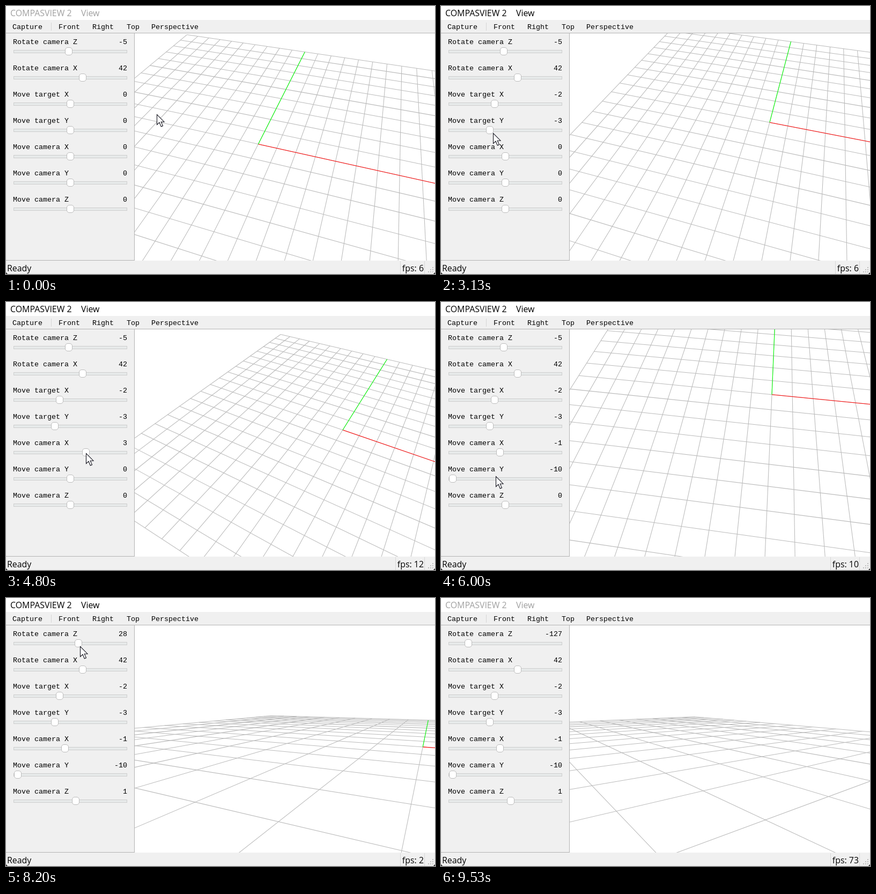
Write an HTML page with a canvas that moves like this. It is 800x500 px and loops after 9670 ms.

```html
<!DOCTYPE html>
<html lang="en">
<head>
<meta charset="utf-8">
<title>COMPASVIEW 2</title>
<style>
  html, body { margin: 0; width: 100%; height: 100%; overflow: hidden; background: #f0f0f0; }
  #app { position: absolute; left: 0; top: 0; width: 800px; height: 500px; overflow: hidden; background: #f0f0f0; color: #000; }
  #app * { position: absolute; box-sizing: border-box; white-space: pre; }
  .ui { font: 15.9px/26px "Open Sans", "Noto Sans", sans-serif; }
  .mono { font: 13.333px/16px "Liberation Mono", "Courier New", monospace; }
  #menu { left: 0; top: 0; width: 800px; height: 26px; background: #fff; }
  #menu.idle { color: #a0a0a0; }
  #tools { left: 0; top: 26px; width: 800px; height: 25px; border-bottom: 1px solid #b4b4b4; }
  #tools span { top: 6px; }
  #hover { left: 2px; top: 2px; width: 80px; height: 21px; background: #e2f1fd; border: 1px solid #cce8ff; }
  #panel { left: 0; top: 51px; width: 240px; height: 424px; border: solid #b4b4b4; border-width: 0 1px 1px 0; }
  #view { left: 240px; top: 51px; }
  .row { left: 0; width: 239px; height: 40px; }
  .row span { top: 0; left: 13px; }
  .row b { top: 0; right: 13px; font-weight: normal; }
  .groove { left: 14px; top: 22px; width: 212px; height: 6px; background: #e7eaea; border: 1px solid #cdcdcd; }
  .thumb { top: 17px; width: 14px; height: 15px; background: #fff; border: 1px solid #bcbcbc; border-radius: 5px; }
  #ready { left: 2px; top: 476px; }
  #fps { right: 21px; top: 476px; }
  .sep { width: 1px; background: #d7d7d7; }
  .dot { width: 2px; height: 2px; background: #bdbdbd; }
  .corner { top: 494px; width: 6px; height: 6px; }
</style>
</head>
<body>
<div id="app">
  <div id="menu" class="ui"><span style="left:8px">COMPASVIEW 2</span><span style="left:140px">View</span></div>
  <div id="tools" class="mono">
    <div id="hover"></div>
    <span style="left:12px">Capture</span><i class="sep" style="left:84px;top:5px;height:15px"></i>
    <span style="left:98px">Front</span><span style="left:161px">Right</span>
    <span style="left:225px">Top</span><span style="left:271px">Perspective</span>
  </div>
  <div id="panel" class="mono"></div>
  <canvas id="view" width="560" height="424"></canvas>
  <span id="ready" class="ui">Ready</span>
  <span id="fps" class="ui"></span>
  <i class="sep" id="split" style="top:476px;height:24px"></i>
  <i class="sep" style="left:780px;top:476px;height:24px"></i>
  <div id="grip"></div>
  <i class="corner" style="left:0;background:radial-gradient(circle at 6px 0,transparent 6px,#222 6.8px)"></i>
  <i class="corner" style="left:794px;background:radial-gradient(circle at 0 0,transparent 6px,#222 6.8px)"></i>
  <svg id="cursor" width="18" height="26" viewBox="-1 -1 18 26" style="left:0;top:0">
    <path d="M.5 .5V19.5L5 15.3L8.3 23L11.5 21.6L8.2 14.2H14Z" fill="#fff" stroke="#14141e" stroke-width="1.1"/>
  </svg>
</div>
<script>
const $ = id => document.getElementById(id);
const LOOP = 9670, STEP = 200 / 3, RAD = Math.PI / 180;
const mix = (a, b, k) => a + (b - a) * k;
const sin = deg => Math.sin(deg * RAD), cos = deg => Math.cos(deg * RAD);
const angle = (rise, run) => Math.atan2(rise, run) / RAD;

// Each drag is a few [tick, value] turns; a tick is 1/15 s, grab is the pointer's offset from the thumb
const sliders = [
  { title: 'Rotate camera Z', max: 180, turns: [[114, -5], [124, 28], [140, -127]], grab: [3, 5] },
  { title: 'Rotate camera X', max: 180, turns: [[0, 42]] },
  { title: 'Move target X', max: 10, turns: [[6, 0], [13, 3], [15, 3], [20, -2]], grab: [3, 4] },
  { title: 'Move target Y', max: 10, turns: [[24, 0], [32, 5], [47, -3]], grab: [6, 5] },
  { title: 'Move camera X', max: 10, turns: [[63, 0], [69, 6], [78, -1]], grab: [4, 1] },
  { title: 'Move camera Y', max: 10, turns: [[81, 0], [82, -10]] },
  { title: 'Move camera Z', max: 10, turns: [[96, 0], [100, 4], [105, 1]], grab: [7, 6] }
];

// Places the free pointer passes between drags
const stops = [[0, 281, 202], [5, 121, 179], [56, 164, 285], [82, 104, 326],
  [87, 84, 324], [90, 102, 325], [94, 150, 391], [111, 72, 36]];

// Camera rules, each reading the slider values, with the frame rate shown
const stages = [
  { from: 0, fps: 6, cam: () => orbit(1.485, -0.217) },
  { from: 7, fps: 6, cam: v => orbit(v[2], -0.217) },
  { from: 25, fps: 6, cam: v => orbit(v[2], v[3]) },
  { from: 64, fps: 12, cam: v => slide(v[4]) },
  { from: 82, fps: 10, cam: () => ({ x: -1.21, y: -9.91, z: 9.75, yaw: 7.9, pitch: 55.3 }) },
  { from: 97, fps: 1, cam: v => ({ x: -1.39, y: -7.48, z: v[6], yaw: 8.37, pitch: angle(v[6] - 0.373, 4.52) }) },
  { from: 115, fps: 2, cam: v => spin(v[0]) },
  { from: 143, fps: 73, cam: v => spin(v[0]) }
];

function orbit(tx, ty) {
  return { x: tx + 2.625, y: ty - 8.72, z: 10.23, yaw: 16.7, pitch: 47 };
}

function slide(x) {
  const d = x - 0.625;
  return {
    x, y: -11.72 - 0.19 * d, z: 10.21 + 0.164 * d,
    yaw: angle(x + 2, 9) + 0.45, pitch: angle(10.05 - 0.045 * d, Math.hypot(x + 2, 9))
  };
}

function spin(yaw) {
  return { x: -2 + 4.52 * sin(yaw), y: -3 - 4.52 * cos(yaw), z: 1.05, yaw, pitch: 7.9 };
}

// The two entries around tick n and the progress between them
function span(list, n) {
  const next = list.findIndex(k => k[0] > n);
  const b = list.at(next), a = next > 0 ? list[next - 1] : b;
  return [a, b, a === b ? 0 : (n - a[0]) / (b[0] - a[0])];
}

function valueAt(s, n) {
  const [a, b, k] = span(s.turns, n);
  return mix(a[1], b[1], sin(90 * k));
}

function grabPoint(s, n) {
  return [120 + 98 * valueAt(s, n) / s.max + s.grab[0], s.y + s.grab[1]];
}

function pointerAt(n) {
  const held = sliders.find(s => s.grab && n >= s.turns[0][0] && n <= s.turns.at(-1)[0]);
  if (held) return grabPoint(held, n);
  const [a, b, k] = span(path, n);
  return [mix(a[1], b[1], k), mix(a[2], b[2], k)];
}

function add(parent, tag, cls, text = '') {
  const el = document.createElement(tag);
  el.className = cls;
  el.textContent = text;
  parent.appendChild(el);
  return el;
}

sliders.forEach((s, i) => {
  const row = add($('panel'), 'div', 'row');
  row.style.top = 9 + 49 * i + 'px';
  s.y = 85 + 49 * i;
  add(row, 'span', '', s.title);
  s.label = add(row, 'b', '');
  add(row, 'i', 'groove');
  s.thumb = add(row, 'i', 'thumb');
});

const path = [...stops];
for (const s of sliders.filter(s => s.grab)) {
  for (const [n] of [s.turns[0], s.turns.at(-1)]) path.push([n, ...grabPoint(s, n)]);
}
path.sort((a, b) => a[0] - b[0]);

for (let r = 0; r < 3; r++) for (let c = 0; c <= r; c++) {
  const dot = add($('grip'), 'i', 'dot');
  dot.style.left = 795 - 4 * c + 'px';
  dot.style.top = 487 + 4 * r + 'px';
}

const ctx = $('view').getContext('2d');
const FOCAL = 212 / Math.tan(22.5 * RAD), NEAR = 0.1;

function drawScene(cam) {
  const cy = cos(cam.yaw), sy = sin(cam.yaw), cp = cos(cam.pitch), sp = sin(cam.pitch);
  const toCam = (X, Y) => {
    const x = X - cam.x, y = Y - cam.y, h = y * cy - x * sy;
    return [x * cy + y * sy, h * sp - cam.z * cp, h * cp + cam.z * sp];
  };
  const clip = (a, b) => {
    if (a[2] >= NEAR) return a;
    const k = (NEAR - a[2]) / (b[2] - a[2]);
    return a.map((v, i) => mix(v, b[i], k));
  };
  const put = p => [280 + FOCAL * p[0] / p[2], 212 - FOCAL * p[1] / p[2]];
  const line = (color, x0, y0, x1, y1) => {
    const a = toCam(x0, y0), b = toCam(x1, y1);
    if (a[2] < NEAR && b[2] < NEAR) return;
    ctx.strokeStyle = color;
    ctx.beginPath();
    ctx.moveTo(...put(clip(a, b)));
    ctx.lineTo(...put(clip(b, a)));
    ctx.stroke();
  };
  ctx.fillStyle = '#fff';
  ctx.fillRect(0, 0, 560, 424);
  ctx.lineWidth = 1.05;
  for (let i = -10; i <= 10; i++) {
    line('#bababa', i, -10, i, 10);
    line('#bababa', -10, i, 10, i);
  }
  line('#f00', 0, 0, 10, 0);
  line('#0f0', 0, 0, 0, 10);
}

let last = -1;
function render(now) {
  requestAnimationFrame(render);
  const n = Math.min(144, Math.floor((now % LOOP) / STEP + 0.08));
  if (n === last) return;
  last = n;
  const values = sliders.map(s => Math.round(valueAt(s, n)) || 0);
  sliders.forEach((s, i) => {
    s.label.textContent = values[i];
    s.thumb.style.left = Math.round(113 + 98 * values[i] / s.max) + 'px';
  });
  const { fps, cam } = stages.findLast(s => s.from <= n);
  drawScene(cam(values));
  $('fps').textContent = 'fps: ' + fps;
  $('split').style.left = (fps > 9 ? 726 : 735) + 'px';
  $('menu').className = n < 7 || n >= 143 ? 'ui idle' : 'ui';
  const [x, y] = pointerAt(n);
  $('hover').style.display = x < 82 && y > 27 && y < 50 ? '' : 'none';
  $('cursor').style.display = n >= 143 ? 'none' : '';
  $('cursor').style.transform = `translate(${Math.round(x) - 1}px,${Math.round(y) - 1}px)`;
}
requestAnimationFrame(render);
</script>
</body>
</html>
```
